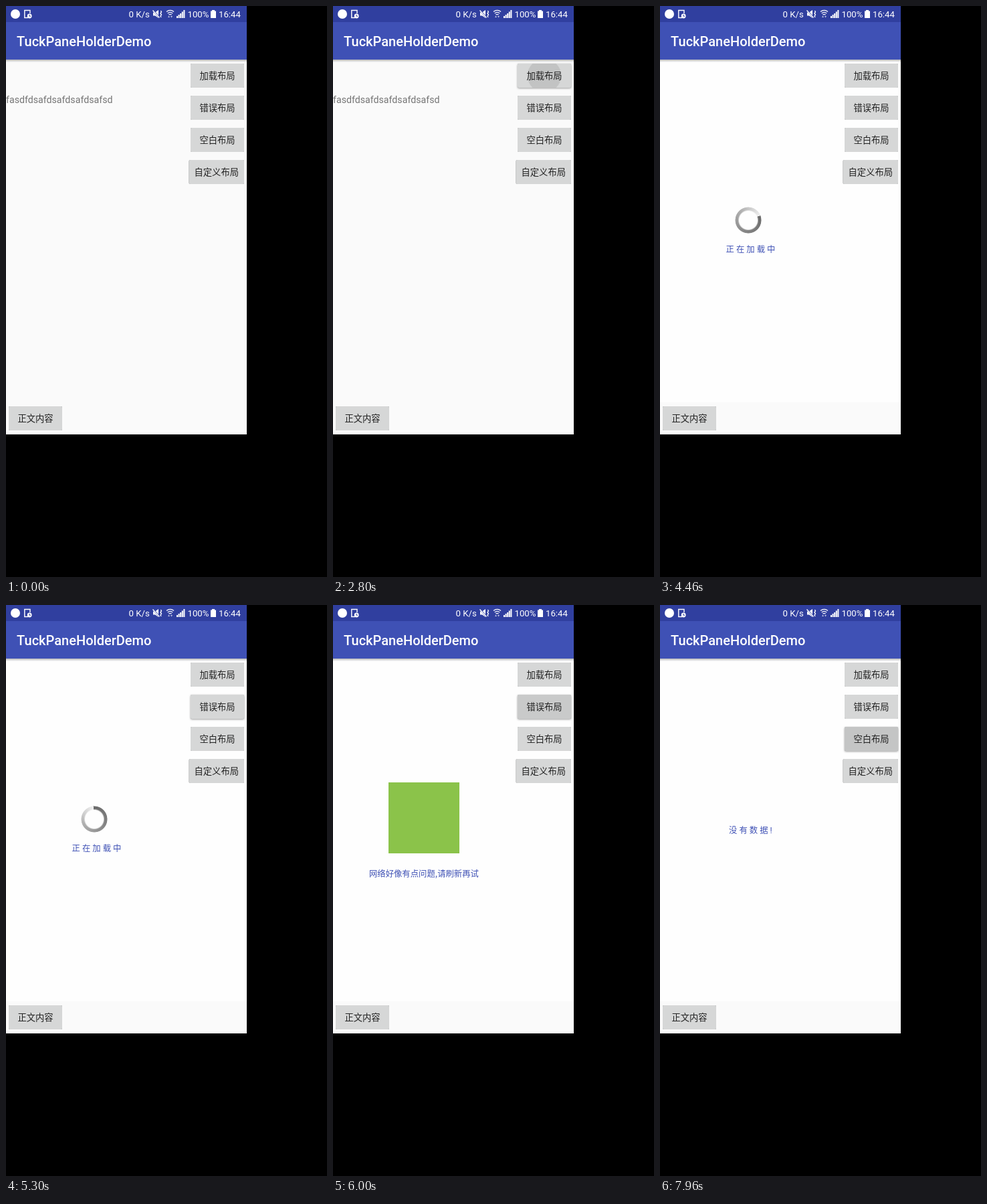
Write an HTML page that moves like this. It is 480 by 853 pixels and loops after 8 s.

```html
<!DOCTYPE html>
<html lang="zh-CN">
<head>
<meta charset="utf-8">
<style>
html, body { margin: 0; width: 100%; height: 100%; overflow: hidden; background: #000; }
svg { position: absolute; left: 0; top: 0; }
text { font-family: Roboto, "Noto Sans CJK SC", "Noto Sans CJK", sans-serif; white-space: pre; }
.label { font-size: 13.3px; fill: #212121; text-anchor: middle; }
.note { font-size: 12.35px; fill: #3f51b5; }
#error text { font-family: "Noto Sans CJK SC", "Noto Sans CJK", sans-serif; }
.status { font-size: 13.2px; fill: #fff; }
#ring {
  position: absolute; left: 112px; top: 299.5px; width: 40px; height: 40px; border-radius: 50%;
  background: conic-gradient(#6a6a6a, #858585 35%, #b0b0b0 70%, #f0f0f0);
  -webkit-mask: radial-gradient(circle, transparent 13.5px, #000 15.5px, #000 19px, transparent 20px);
  mask: radial-gradient(circle, transparent 13.5px, #000 15.5px, #000 19px, transparent 20px);
}
</style>
</head>
<body>
<svg width="480" height="853" viewBox="0 0 480 853">
  <defs>
    <linearGradient id="shade" x2="0" y2="1">
      <stop stop-opacity=".28"/><stop offset="1" stop-opacity="0"/>
    </linearGradient>
  </defs>
  <rect width="360" height="640" fill="#fafafa"/>
  <text id="body" y="145" font-size="14.2" fill="#757575">fasdfdsafdsafdsafdsafsd</text>
  <rect id="pane" y="80" width="360" height="512" fill="#fefefe"/>
  <text id="loading" class="note" x="98.5" y="368">正 在 加 载 中</text>
  <g id="error">
    <rect x="83" y="265" width="106" height="106" fill="#8bc34a"/>
    <text class="note" x="54" y="405.7">网络好像有点问题,请刷新再试</text>
  </g>
  <text id="empty" class="note" x="103" y="340.7">没 有 数 据 !</text>

  <rect width="360" height="24" fill="#303f9f"/>
  <rect y="24" width="360" height="56" fill="#3f51b5"/>
  <rect y="80" width="360" height="4" fill="url(#shade)"/>
  <text x="16" y="59.5" font-size="20" font-weight="500" fill="#fff">TuckPaneHolderDemo</text>

  <g fill="#fff">
    <circle cx="14" cy="12" r="7"/>
    <path d="M33 17.5H27.8V6.5H36V11" fill="none" stroke="#fff" stroke-width="1.4"/>
    <circle cx="35.2" cy="15" r="3.4"/>
    <path d="M35 13V15.2H37" fill="none" stroke="#303f9f"/>
    <path d="M220 9.5H223L228 6V18L223 14.5H220Z"/>
    <path d="M219.5 6L230 18" stroke="#303f9f" stroke-width="2.4"/>
    <path d="M219.5 6.5L229.5 17.5M231.5 7l1 2-1.5 2 1.5 2-1.5 2 1 2" fill="none" stroke="#fff" stroke-width="1.3"/>
    <path d="M240 8.6Q245.5 4 251 8.6M241.8 11Q245.5 7.8 249.2 11M243.5 13.2Q245.5 11.6 247.5 13.2" fill="none" stroke="#fff" stroke-width="1.3"/>
    <path d="M243.5 14.5L242 17H245ZM247.5 17.5L246 15H249Z" opacity=".7"/>
    <path d="M255 15h2v3h-2zM257.6 13h2v5h-2zM260.2 11h2v7h-2zM262.8 8.5h2v9.5h-2zM265.4 6h2v12h-2z"/>
    <path d="M306 7.5h2V6h4v1.5h2V18h-8z"/>
  </g>
  <text class="status" x="183.5" y="17.3">0 K/s</text>
  <text class="status" x="271.5" y="17.3">100%</text>
  <text class="status" x="318" y="17.3">16:44</text>
  <g id="buttons"></g>
</svg>
<div id="ring"></div>
<script>
const LOOP = 8000, CLICK = 320;
const $ = id => document.getElementById(id);
const ramp = (t, a, b) => Math.min(1, Math.max(0, (t - a) / (b - a)));

// label, x, y, width, press time
const buttons = [
  ['加载布局', 276, 86, 80, 2500],
  ['错误布局', 276, 134, 80, 5200],
  ['空白布局', 276, 182, 80, 7420],
  ['自定义布局', 273.5, 230, 82.5, Infinity],
  ['正文内容', 4, 598, 80, Infinity]
].map(([label, x, y, w, press], i) => {
  const box = `x="${x}" y="${y}" width="${w}" height="36" rx="2"`;
  const cx = x + w / 2, cy = y + 18;
  $('buttons').insertAdjacentHTML('beforeend', `
    <clipPath id="clip${i}"><rect ${box}/></clipPath>
    <rect id="face${i}" ${box} fill="#d6d7d7"/>
    <circle id="ripple${i}" cx="${cx}" cy="${cy}" clip-path="url(#clip${i})"/>
    <text class="label" x="${cx}" y="${cy + 4.7}">${label}</text>`);
  return { press, face: $('face' + i), ripple: $('ripple' + i) };
});

const show = (id, on) => $(id).style.visibility = on ? 'visible' : 'hidden';

function drawButton({ press, face, ripple }, t) {
  const age = t - press;
  const lift = ramp(age, 0, 100) * (1 - ramp(age, 1700, 1900));
  face.style.filter = 'drop-shadow(0 0 .6px rgba(0,0,0,.25)) ' +
    `drop-shadow(0 ${0.8 + lift * 0.7}px ${0.7 + lift}px rgba(0,0,0,${0.28 + lift * 0.1}))`;
  ripple.setAttribute('r', 46 * ramp(age, 120, 450));
  ripple.setAttribute('fill-opacity', 0.095 * (1 - ramp(age, 450, 1500)));
}

function draw(now) {
  const t = now % LOOP;
  const state = buttons.filter(b => t >= b.press + CLICK).length;
  show('body', state === 0);
  show('pane', state > 0);
  ['loading', 'error', 'empty'].forEach((id, i) => show(id, state === i + 1));
  show('ring', state === 1);
  $('ring').style.transform = `rotate(${95 + (t - 3480) * 0.3407}deg)`;
  buttons.forEach(b => drawButton(b, t));
}

const start = performance.now();
function tick() {
  draw(performance.now() - start);
  requestAnimationFrame(tick);
}
tick();
</script>
</body>
</html>
```
